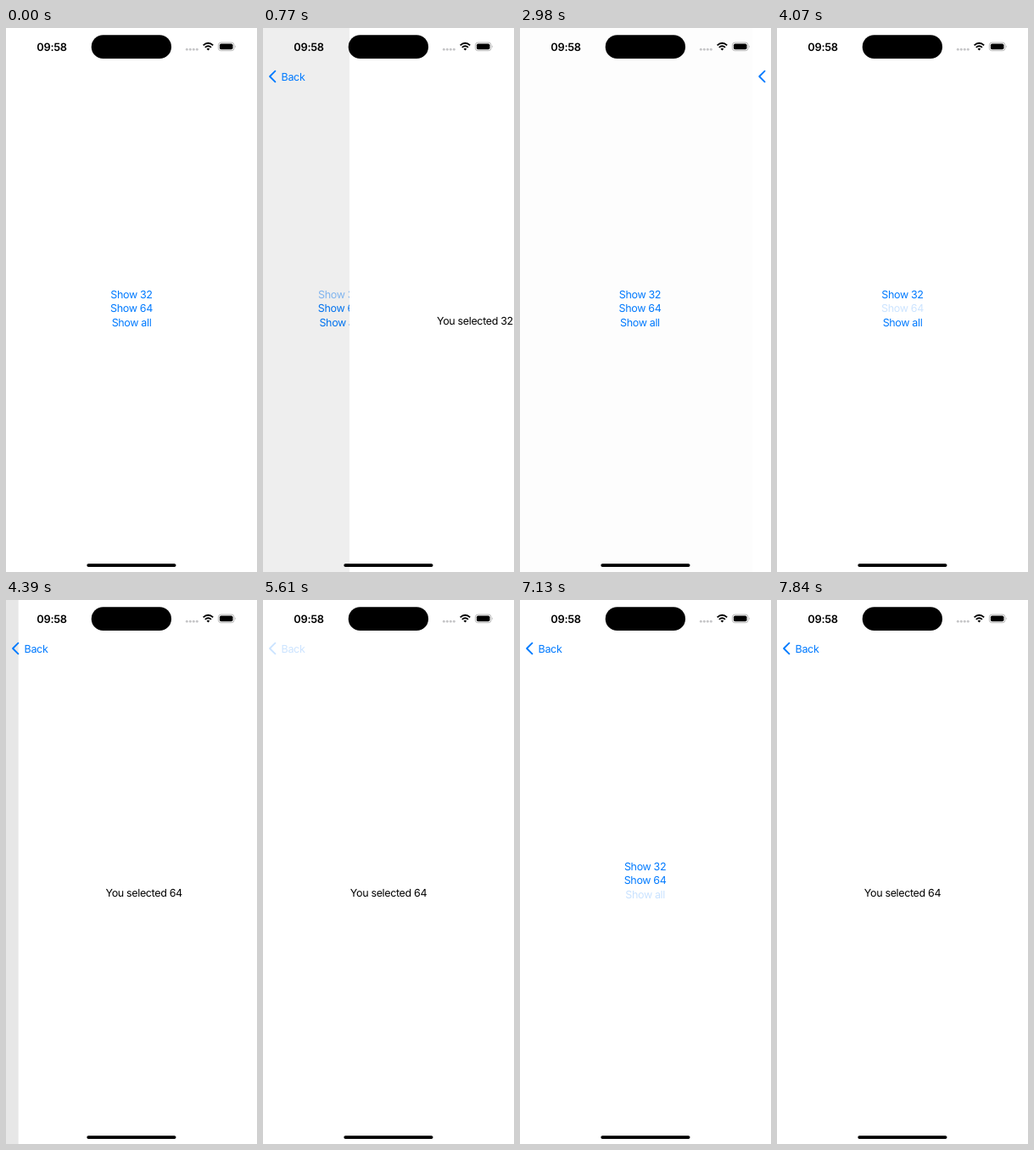
Write an HTML page that moves like this. It is 296 px wide and 640 px high and loops after 8000 ms.

```html
<!DOCTYPE html>
<html lang="en">
<head>
<meta charset="utf-8">
<title>Navigation demo</title>
<style>
  html, body { margin: 0; width: 100%; height: 100%; overflow: hidden; background: #fff; }
  svg { display: block; width: 296px; height: 640px; }
  text {
    font: 400 12.5px Inter, "Liberation Sans", sans-serif;
    letter-spacing: -.028em;
    text-rendering: geometricPrecision;
  }
  .mid { text-anchor: middle; }
  .link { fill: #007aff; }
  .clock { font-size: 12.8px; font-weight: 600; letter-spacing: -.02em; }
</style>
</head>
<body>
<svg viewBox="0 0 296 640">
  <g id="root">
    <rect width="296" height="640" fill="#fff"/>
    <g class="mid link">
      <text class="row" x="148" y="317.5">Show 32</text>
      <text class="row" x="148" y="334.2">Show 64</text>
      <text class="row" x="148" y="350.8">Show all</text>
    </g>
  </g>
  <rect id="dim" width="296" height="640"/>

  <g id="page">
    <rect width="296" height="640" fill="#fff"/>
    <text id="label" class="mid" x="148" y="348.6"></text>
  </g>

  <g id="back">
    <path d="M14.4 50.6 L8 57 L14.4 63.4" fill="none" stroke="#007aff" stroke-width="1.8"
      stroke-linecap="round" stroke-linejoin="round"/>
    <text class="link" x="21.6" y="61.6">Back</text>
  </g>

  <g id="status">
    <text class="mid clock" x="54" y="26.6">09:58</text>
    <rect x="100.7" y="8.3" width="94.3" height="27.8" rx="13.9"/>
    <g fill="#c6c6c8">
      <circle cx="213.3" cy="25.2" r="1.45"/>
      <circle cx="217.3" cy="25.2" r="1.45"/>
      <circle cx="221.3" cy="25.2" r="1.45"/>
      <circle cx="225.3" cy="25.2" r="1.45"/>
    </g>
    <g fill="none" stroke="#000" stroke-width="1.8">
      <path d="M232.6 20.4 Q238.4 15 244.2 20.4"/>
      <path d="M234.8 22.9 Q238.4 19.6 242 22.9"/>
    </g>
    <path d="M236.5 24.6 Q238.4 23 240.3 24.6 L238.4 26.6 Z"/>
    <rect x="250.4" y="17.1" width="18.6" height="9.6" rx="3" fill="none" stroke="#a6a6a6" stroke-width=".8"/>
    <rect x="251.9" y="18.5" width="15.6" height="6.8" rx="1.8"/>
    <path d="M270 20.3 Q271.4 21.9 270 23.5 Z" fill="#a6a6a6"/>
    <rect x="95.3" y="630.2" width="105.2" height="3.8" rx="1.9"/>
  </g>
</svg>

<script>
  const LOOP = 8000, WIDTH = 296, RATE = 0.0195, PARALLAX = 0.3, FADED = 0.2;

  // A move with a row pushes the detail page; one without goes back.
  const moves = [
    { press: -2000, start: -2000, label: 32 },
    { press: 500, start: 655, row: 0, label: 32 },
    { press: 2630, start: 2761, label: 32 },
    { press: 4070, start: 4146, row: 1, label: 64 },
    { press: 5610, start: 5732, label: 64 },
    { press: 7100, start: 7125, row: 2, label: 64 }
  ];

  // Screen refresh times: the picture holds between them.
  const ticks = [
    0, 500, 660, 770, 880, 990, 1100, 1370,
    2630, 2770, 2870, 2980, 3080, 3180, 3440,
    4070, 4180, 4290, 4390, 4510, 4620, 4840,
    5610, 5740, 5850, 5950, 6060, 6160, 6420,
    7130, 7240, 7360, 7470, 7580, 7840
  ];

  const get = id => document.getElementById(id);
  const root = get("root"), dim = get("dim"), page = get("page");
  const back = get("back"), label = get("label");
  const rows = document.querySelectorAll(".row");

  const lastBefore = (list, test) => list.filter(test).pop();
  const slide = (el, x) => el.setAttribute("transform", `translate(${x.toFixed(3)} 0)`);

  // Critically damped spring: the share of the way still to go.
  function remaining(ms) {
    const s = Math.max(0, ms) * RATE;
    return (1 + s) * Math.exp(-s);
  }

  function released(ms, fade) {
    return FADED + (1 - FADED) * Math.min(1, Math.max(0, ms / fade));
  }

  function draw(time) {
    const t = lastBefore(ticks, k => k <= time);
    const move = lastBefore(moves, m => m.press <= t);
    const push = move.row !== undefined;
    const age = t - move.start;
    const left = remaining(age);
    const shown = push ? 1 - left : left;
    const x = WIDTH * (1 - shown);

    slide(root, -PARALLAX * WIDTH * shown);
    slide(page, x);
    slide(back, push ? 0 : x);
    dim.style.opacity = 0.1 * shown;
    back.style.opacity = push ? (age >= 0 ? 1 : 0) : released(age, 200);
    rows.forEach((row, i) => {
      row.style.opacity = i === move.row ? released(age, 350) : 1;
    });
    label.textContent = "You selected " + move.label;
  }

  const begin = performance.now();
  function frame() {
    draw((performance.now() - begin) % LOOP);
    requestAnimationFrame(frame);
  }
  frame();
</script>
</body>
</html>
```
